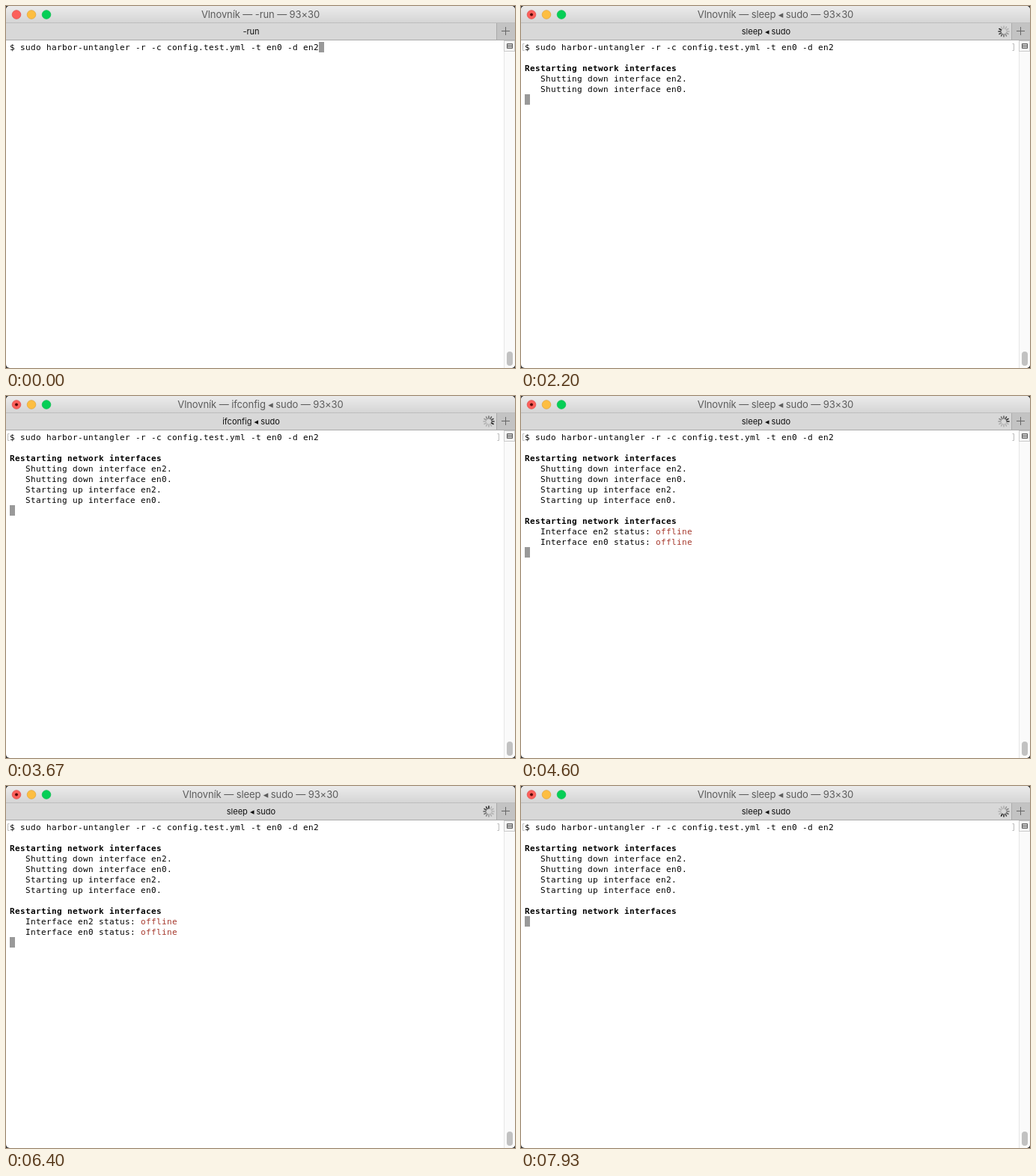
An HTML page for the animation above (8000 ms loop, 680 by 484 pixels).

```html
<!DOCTYPE html>
<html lang="en">
<head>
<meta charset="utf-8">
<title>Console session</title>
<style>
  html, body { margin: 0; width: 100%; height: 100%; overflow: hidden; background: #333; }
  svg { display: block; }
  .ui { font-family: Inter, "DejaVu Sans", sans-serif; text-anchor: middle; }
  #title { font-size: 13px; letter-spacing: -.1px; fill: #5c5c5c; }
  #tab { font-size: 11px; fill: #111; }
  /* Terminal grid: 7 px columns, 14 px rows */
  .row { font: 11px "DejaVu Sans Mono", monospace; letter-spacing: calc(7px - .602em); white-space: pre; }
  .bold { font-weight: bold; }
  .offline { fill: #a5372b; }
</style>
</head>
<body>
<svg width="680" height="484" viewBox="0 0 680 484">
  <defs>
    <linearGradient id="bar" x2="0" y2="1">
      <stop stop-color="#ebebeb"/><stop offset="1" stop-color="#d5d5d5"/>
    </linearGradient>
    <clipPath id="window"><rect width="680" height="484" rx="5"/></clipPath>
  </defs>
  <g clip-path="url(#window)">
    <rect width="680" height="484" fill="#fff"/>
    <rect width="680" height="22" fill="url(#bar)"/>
    <rect y="22" width="680" height="1" fill="#bdbdbd"/>
    <rect y="23" width="655" height="22" fill="#d8d8d8"/>
    <rect x="655" y="23" width="25" height="22" fill="#c3c3c3"/>
    <rect x="655" y="23" width="1" height="22" fill="#aaa"/>
    <rect y="45" width="680" height="1" fill="#ababab"/>
    <path d="M662 33.5h11M667.5 28v11" stroke="#666"/>
    <g stroke-width=".7">
      <circle cx="14" cy="11.5" r="5.8" fill="#fc605b" stroke="#de4643"/>
      <circle cx="34" cy="11.5" r="5.8" fill="#fdbe41" stroke="#dea034"/>
      <circle cx="54" cy="11.5" r="5.8" fill="#06cf56" stroke="#05b84a"/>
    </g>
    <circle id="busy" cx="14" cy="11.5" r="2" fill="#590a08"/>
    <text id="title" class="ui" x="340" y="16"/>
    <text id="tab" class="ui" x="327.5" y="38"/>
    <g id="spinner" transform="translate(645 34)" stroke="#222" stroke-width="1.6" stroke-linecap="round"/>

    <rect x="665" y="46" width="15" height="438" fill="#fafafa"/>
    <rect x="665" y="46" width="1" height="438" fill="#e6e6e6"/>
    <rect x="665.5" y="46.5" width="14" height="14" fill="#f6f6f6" stroke="#ccc"/>
    <path d="M669.5 50.5h7v6h-7zM670 52.5h6M670 54.5h6" fill="none" stroke="#555"/>
    <rect x="669" y="462" width="8" height="19" rx="4" fill="#c1c1c1"/>

    <rect id="cursor" width="7" height="14" fill="#999"/>
    <path id="marks" d="M4.5 50.5h-2v9h2M656.500 50.5h2v9h-2" fill="none" stroke="#bbb"/>
    <g id="screen"></g>
  </g>
</svg>
<script>
const LOOP = 8000;
const SPOKES = 12;
const $ = id => document.getElementById(id);

function add(parent, tag, attributes, text = "") {
  const node = document.createElementNS("http://www.w3.org/2000/svg", tag);
  for (const name in attributes) node.setAttribute(name, attributes[name]);
  node.textContent = text;
  return parent.appendChild(node);
}

const heading = "*Restarting network interfaces";
const indented = text => "   " + text;
const status = name => indented(`Interface ${name} status: |offline`);
// "*" marks a bold row, "|" starts the coloured part
const lines = [
  "$ sudo harbor-untangler -r -c config.test.yml -t en0 -d en2",
  "",
  heading,
  indented("Shutting down interface en2."),
  indented("Shutting down interface en0."),
  indented("Starting up interface en2."),
  indented("Starting up interface en0."),
  "",
  heading,
  status("en2"),
  status("en0"),
];

// Start time, process shown in the title, finished rows
const steps = [
  [0, "-run", 0],
  [800, "Velrun ◂ sudo", 1],
  [1270, "ifconfig ◂ sudo", 4],
  [1400, "sleep ◂ sudo", 5],
  [3400, "ifconfig ◂ sudo", 6],
  [3530, "ifconfig ◂ sudo", 7],
  [3730, "ifconfig ◂ sudo", 10],
  [3870, "sleep ◂ sudo", 11],
  [7900, "sleep ◂ sudo", 9],
];

const rows = lines.map((line, i) => {
  const bold = line.startsWith("*");
  const [plain, coloured] = line.replace("*", "").split("|");
  const row = add($("screen"), "text", { class: bold ? "row bold" : "row", x: 5, y: 59 + 14 * i }, plain);
  if (coloured) add(row, "tspan", { class: "offline" }, coloured);
  return row;
});

const spokes = Array.from({ length: SPOKES }, (_, i) =>
  add($("spinner"), "path", { d: "M0-4V-7", transform: `rotate(${i * 360 / SPOKES})` }));

const show = (node, visible) => node.setAttribute("visibility", visible ? "visible" : "hidden");

function draw(now) {
  const time = now % LOOP;
  const [, process, done] = steps.findLast(([start]) => time >= start);
  const running = done > 0;

  $("title").textContent = `Vlnovník — ${process} — 93×30`;
  $("tab").textContent = process;
  show($("busy"), running);
  show($("marks"), running);
  show($("spinner"), time >= steps[2][0]);
  rows.forEach((row, i) => show(row, i < Math.max(done, 1)));
  $("cursor").setAttribute("x", running ? 5 : 5 + 7 * lines[0].length);
  $("cursor").setAttribute("y", 48 + 14 * done);

  const head = Math.floor(time / 1000 * SPOKES) + 8;
  spokes.forEach((spoke, i) => {
    const age = (head - i) % SPOKES;
    spoke.setAttribute("opacity", Math.max(.2, 1 - age / 9));
  });
  requestAnimationFrame(draw);
}
requestAnimationFrame(draw);
</script>
</body>
</html>
```
